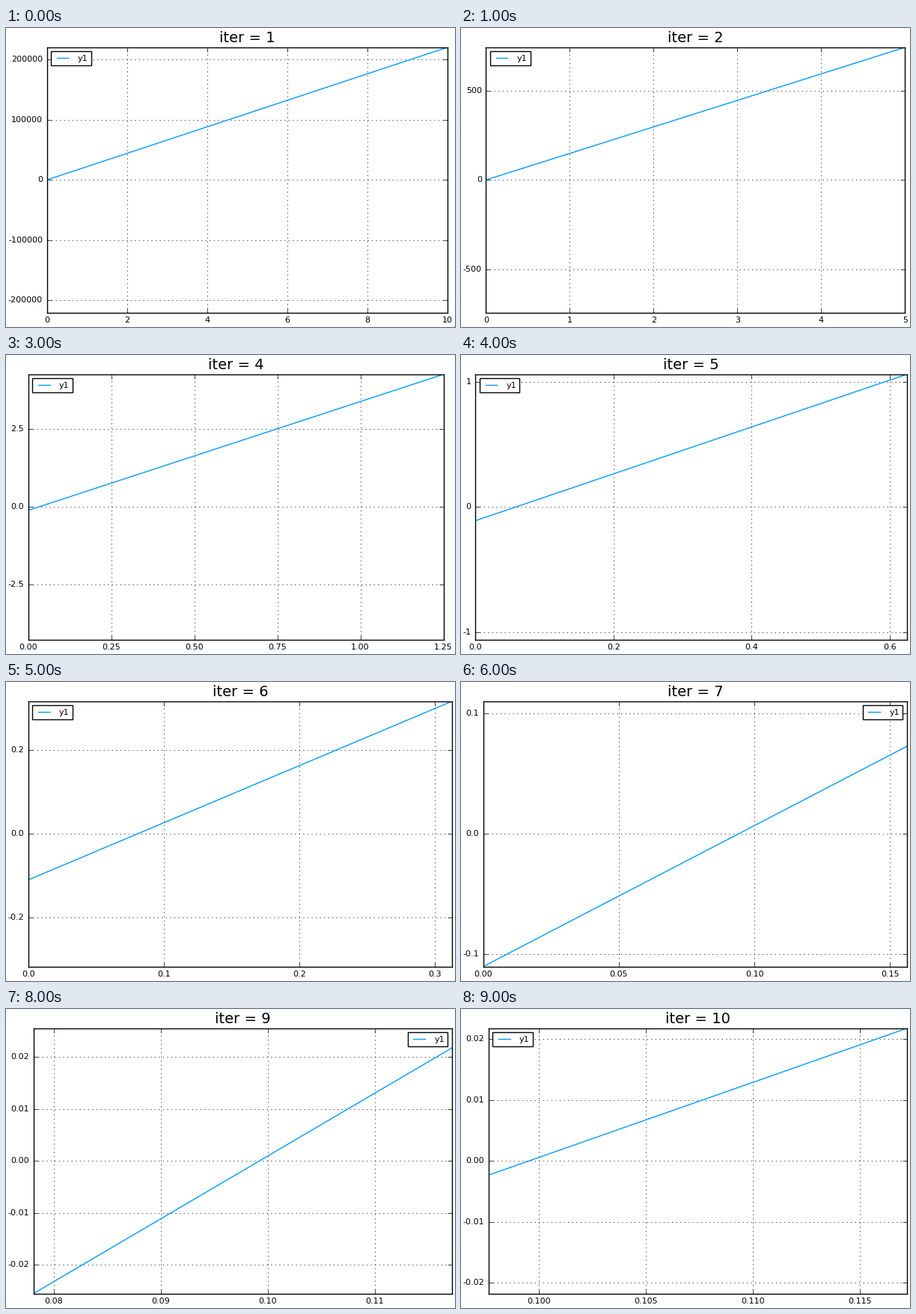
A matplotlib script that plays this animation: 600 px wide and 400 px high, repeating every 10000 ms.

```python
import math

import matplotlib.pyplot as plt
from matplotlib.animation import FuncAnimation

W, H, DPI = 600, 400, 100
TOP, BOTTOM = 25.85, 380.55
BLUE = "#009AFA"
FONT_PX = 8 * DPI / 72

X_STEPS = [2, 1, 0.5, 0.25, 0.2, 0.1, 0.05, 0.05, 0.01, 0.005]
Y_STEPS = [100000, 500, 20, 2.5, 1, 0.2, 0.1, 0.05, 0.01, 0.01]

plt.style.use("classic")
plt.rcParams.update({
    "font.family": "DejaVu Sans",
    "figure.facecolor": "white",
    "savefig.dpi": "figure",
    "xtick.labelsize": 8,
    "ytick.labelsize": 8,
})


def f(x):
    return x * math.exp(x) - 0.11


def bisect(lo, hi, count):
    """Successive brackets around the root of f."""
    spans = []
    for _ in range(count):
        spans.append((lo, hi))
        mid = (lo + hi) / 2
        if f(mid) > 0:
            hi = mid
        else:
            lo = mid
    return spans


def ticks(lo, hi, step):
    digits = 0
    while abs(step * 10**digits - round(step * 10**digits)) > 1e-9:
        digits += 1
    first = math.ceil(lo / step - 1e-9)
    last = math.floor(hi / step + 1e-9)
    values = [n * step for n in range(first, last + 1)]
    return values, [f"{v:.{digits}f}" for v in values]


def text_width(text):
    return FONT_PX * sum({"-": 0.361, ".": 0.318}.get(c, 0.636) for c in text)


SPANS = bisect(0.0, 10.0, len(X_STEPS))

fig = plt.figure(figsize=(W / DPI, H / DPI), dpi=DPI)
ax = fig.add_axes([0.1, 0.1, 0.8, 0.8])


def draw(i):
    lo, hi = SPANS[i]
    ends = [f(lo), f(hi)]
    peak = max(abs(v) for v in ends)
    xt, xlabels = ticks(lo, hi, X_STEPS[i])
    yt, ylabels = ticks(-peak, peak, Y_STEPS[i])

    # margins leave room for the widest y label and a label at the right end
    left = 8.15 + max(text_width(s) for s in ylabels)
    right = 595.9
    if abs(xt[-1] - hi) < 1e-9:
        right = 596.95 - text_width(xlabels[-1]) / 2

    ax.clear()
    ax.set_position([left / W, 1 - BOTTOM / H,
                     (right - left) / W, (BOTTOM - TOP) / H])
    ax.plot([lo, hi], ends, color=BLUE, lw=1, label="y1")
    ax.set_xlim(lo, hi)
    ax.set_ylim(-peak, peak)
    ax.set_xticks(xt, xlabels)
    ax.set_yticks(yt, ylabels)
    ax.grid(True, color="black", ls=":", lw=0.5)
    ax.set_axisbelow(True)
    ax.set_title(f"iter = {i + 1}", fontsize=14)
    ax.legend(loc="best", fontsize=8, framealpha=1)
    return []


anim = FuncAnimation(fig, draw, frames=len(SPANS), interval=1000,
                     init_func=lambda: draw(0), repeat=True, repeat_delay=0)
plt.show()
```
